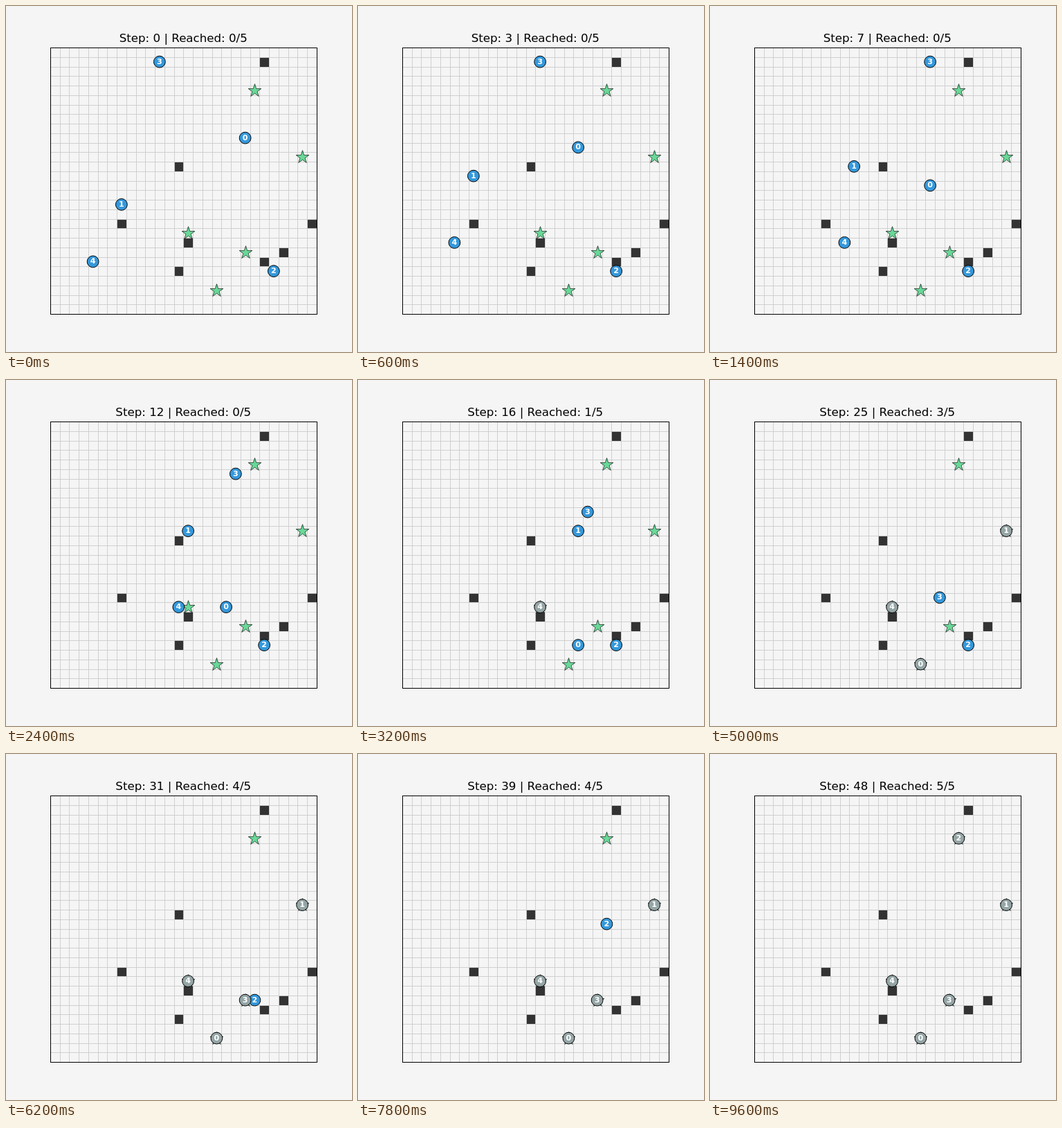
These frames come from a looping animation (500 by 500 pixels, 9.8 s). An HTML page with a canvas:

```html
<!DOCTYPE html>
<html lang="en">
<head>
<meta charset="utf-8">
<title>Grid agents</title>
<style>
  html, body { margin: 0; width: 100%; height: 100%; overflow: hidden; background: #f5f5f5; }
  canvas { display: block; }
</style>
</head>
<body>
<canvas id="stage" width="500" height="500"></canvas>
<script>
const ctx = document.getElementById('stage').getContext('2d');
const STEP_MS = 200, STEPS = 49;
const CELLS = 28, CELL = 13.75, LEFT = 63.75, TOP = 60;
const MOVES = { L: [-1, 0], R: [1, 0], U: [0, -1], D: [0, 1], W: [0, 0] };

const obstacles = [[22, 1], [13, 12], [7, 18], [27, 18], [14, 20], [24, 21], [22, 22], [13, 23]];
const goals = [[21, 4], [26, 11], [14, 19], [20, 21], [17, 25]];

// Each route is a run of direction letters with repeat counts; W waits.
const agents = [
  [20, 9, 'L2 D16 L1'],
  [7, 16, 'U4 R5 U1 R14'],
  [23, 23, 'L1 W27 L1 U19'],
  [11, 1, 'R8 D20 R1'],
  [4, 22, 'U2 R9 U1 R1'],
].map(([col, row, route]) => {
  const cells = [[col, row]];
  for (const leg of route.split(' ')) {
    const [dx, dy] = MOVES[leg[0]];
    for (let n = +leg.slice(1); n > 0; n--) cells.push([col += dx, row += dy]);
  }
  return cells;
});

const centerX = col => LEFT + CELL * (col + 0.5);
const centerY = row => TOP + CELL * (row + 0.5);
const crisp = v => Math.round(v) + 0.5;

function drawGrid() {
  ctx.fillStyle = '#333';
  for (const [col, row] of obstacles)
    ctx.fillRect(Math.round(LEFT + col * CELL), Math.round(TOP + row * CELL), 14, 14);

  const x0 = crisp(LEFT), y0 = crisp(TOP), size = CELLS * CELL;
  ctx.strokeStyle = 'rgba(204,204,204,0.9)';
  ctx.lineWidth = 1;
  ctx.beginPath();
  for (let i = 1; i < CELLS; i++) {
    const x = crisp(LEFT + i * CELL), y = crisp(TOP + i * CELL);
    ctx.moveTo(x, y0);
    ctx.lineTo(x, y0 + size);
    ctx.moveTo(x0, y);
    ctx.lineTo(x0 + size, y);
  }
  ctx.stroke();
  ctx.strokeStyle = '#000';
  ctx.strokeRect(x0, y0, size, size);
}

function drawStar([col, row]) {
  const x = crisp(centerX(col)), y = crisp(centerY(row));
  ctx.beginPath();
  for (let i = 0; i < 10; i++) {
    const r = i % 2 ? 3.75 : 9.82, a = i * Math.PI / 5;
    ctx.lineTo(x + r * Math.sin(a), y - r * Math.cos(a));
  }
  ctx.closePath();
  ctx.globalAlpha = 0.7;
  ctx.fillStyle = '#2ecc71';
  ctx.fill();
  ctx.strokeStyle = '#000';
  ctx.lineWidth = 0.9;
  ctx.stroke();
  ctx.globalAlpha = 1;
}

function drawAgent(cells, id, step) {
  const last = cells.length - 1;
  const [col, row] = cells[Math.min(step, last)];
  const x = centerX(col), y = centerY(row);
  ctx.beginPath();
  ctx.arc(x, y, 8.4, 0, Math.PI * 2);
  ctx.fillStyle = step >= last ? '#95a5a6' : '#3498db';
  ctx.fill();
  ctx.strokeStyle = '#000';
  ctx.lineWidth = 1;
  ctx.stroke();
  ctx.fillStyle = '#fff';
  ctx.font = 'bold 11.11px "DejaVu Sans", sans-serif';
  ctx.fillText(id, x, Math.round(y + 2.9));
}

function draw(step) {
  ctx.fillStyle = '#f5f5f5';
  ctx.fillRect(0, 0, 500, 500);
  drawGrid();
  goals.forEach(drawStar);
  ctx.textAlign = 'center';
  agents.forEach((cells, id) => drawAgent(cells, id, step));

  const reached = agents.filter(cells => step >= cells.length - 1).length;
  ctx.fillStyle = '#000';
  ctx.font = '16.67px "DejaVu Sans", sans-serif';
  ctx.fillText(`Step: ${step} | Reached: ${reached}/${agents.length}`, 256.25, 52);
}

const start = performance.now();
function tick() {
  draw(Math.floor((performance.now() - start) / STEP_MS) % STEPS);
  requestAnimationFrame(tick);
}
tick();
</script>
</body>
</html>
```
